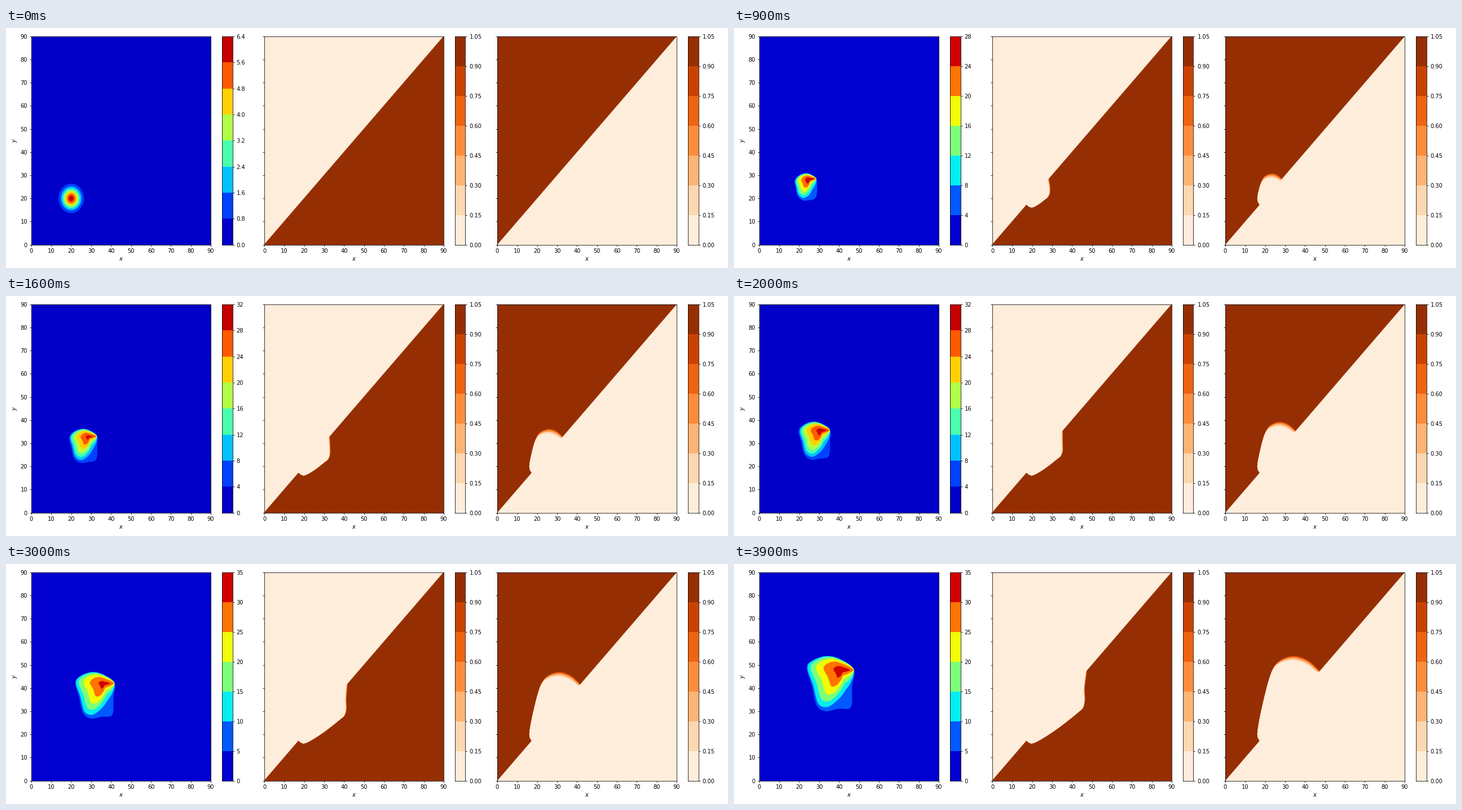
Write a matplotlib script that moves like this. It is 1280x427 px and loops after 4 s.

```python
import numpy as np
import matplotlib.pyplot as plt
from matplotlib.animation import FuncAnimation
from matplotlib.patches import Polygon
from matplotlib.ticker import MaxNLocator

W, H, DPI = 1280, 427, 64
SCALE = 10 / 9
FRAMES, INTERVAL = 40, 100
LEFT, TOP, BOTTOM, WIDTH, PITCH = 45, 15, 385.5, 318, 413
BAR_OFFSET, BAR_WIDTH = 338, 18.5

plt.rcParams.update({
    "font.family": "DejaVu Sans",
    "font.size": 10 * SCALE,
    "axes.linewidth": 0.8 * SCALE,
    "axes.labelpad": 4 * SCALE,
    **{f"{a}tick.major.{k}": v * SCALE for a in "xy"
       for k, v in (("size", 3.5), ("width", 0.8), ("pad", 3.5))},
})

# The fire starts as a small disc; every mark travels in a straight line
# from an angle on its rim to a final position.
IGNITION, RADIUS = np.array([20, 20]), 3.9
CORE_START, CORE_END = np.array([20, 22.3]), np.array([41.6, 47.7])
EDGE_HEAT = 5

# angle, final x, final y, exponent of the heat profile from edge to core
HEAT_EDGE = np.array([
    (167, 23.8, 49.6, 2.1), (135, 26.9, 52.1, 2.3), (90, 34, 53.9, 2.6),
    (60, 41, 52.3, 3), (45, 47.4, 47.9, 8), (25, 46.5, 40.7, 0.95),
    (-45, 45.7, 31.6, 0.4), (-83, 39.6, 31.1, 0.75), (-113, 33.1, 30, 1.3),
    (-154, 29.2, 31.9, 1.6), (-180, 26.3, 40.9, 1.75)])

# angle, final x, final y, thickness of the burning band
LOWER_EDGE = np.array([
    (-80, 30, 20.9, 0), (-75, 43.3, 29.7, 0.1), (-45, 45.6, 31.5, 0.5),
    (-20, 46.5, 34.5, 0.5), (10, 46.4, 40, 0.7), (45, 47.5, 47.5, 1)])
UPPER_EDGE = np.array([
    (178, 18.9, 33.5, 0), (172, 24, 48.5, 0.4), (135, 27.2, 51.8, 1.3),
    (90, 34, 53.9, 2), (66, 41.3, 52.1, 1.9), (45, 47.4, 47.4, 1.2)])


def ring(degrees, radius=RADIUS):
    a = np.radians(degrees)
    return IGNITION + radius * np.column_stack([np.cos(a), np.sin(a)])


def travel(n, start, end):
    return start + (end - start) * n / (FRAMES - 1)


def smooth(points, closed=False, steps=10):
    """Hermite curve through the points."""
    p = np.asarray(points, float)
    if closed:
        p = np.vstack([p[-1:], p, p[:2]])
    else:
        p = np.vstack([2 * p[0] - p[1], p, 2 * p[-1] - p[-2]])
    gaps = np.sqrt(np.hypot(*np.diff(p, axis=0).T)) + 1e-6
    slope = np.gradient(p, np.concatenate([[0], np.cumsum(gaps)]), axis=0)
    u = np.linspace(0, 1, steps + 1)[:, None]
    parts = []
    for i in range(1, len(p) - 2):
        parts.append((2*u**3 - 3*u**2 + 1) * p[i] + (3*u**2 - 2*u**3) * p[i + 1]
                     + gaps[i] * ((u**3 - 2*u**2 + u) * slope[i]
                                  + (u**3 - u**2) * slope[i + 1]))
    return np.vstack(parts)


def peak_heat(n):
    return 35 - 12.5 * np.exp(-n / 17.5) if n else 6


def isoline(n, level):
    if n == 0:  # Gaussian spot
        return ring(np.linspace(0, 360, 90), np.sqrt(20 * np.log(6 / level)))
    angle, power = HEAT_EDGE[:, 0], HEAT_EDGE[:, 3:]
    edge = travel(n, ring(angle), HEAT_EDGE[:, 1:3])
    core = travel(n, CORE_START, CORE_END)
    s = (level - EDGE_HEAT) / (peak_heat(n) - EDGE_HEAT)
    reach = s if s < 0 else s ** power
    return smooth(edge + (core - edge) * reach, closed=True)


def burnt_area(n, marks, trail_end, beyond, depth):
    """Fixed trail along the disc, then the front, closed past the diagonal."""
    front = travel(n, ring(marks[:, 0]), marks[:, 1:3])
    inward = IGNITION - front
    inward /= np.linalg.norm(inward, axis=1, keepdims=True)
    front += inward * marks[:, 3:] * depth * (1 + 1 / n**2)
    curve = smooth(np.vstack([ring(np.linspace(225, trail_end, 3)), front]))
    return np.vstack([curve, curve[-1] + beyond, curve[0] + beyond])


def band_colors(name, count):
    return plt.get_cmap(name)((np.arange(count) + 0.5) / count)


def pixel_axes(x, width):
    return fig.add_axes([x / W, 1 - BOTTOM / H, width / W, (BOTTOM - TOP) / H])


def draw_colorbar(ax, colors, labels):
    ax.clear()
    count = len(colors)
    ax.barh(np.arange(count), 1, height=1, align="edge", color=colors)
    ax.set(xlim=(0, 1), ylim=(0, count), xticks=[])
    ax.set_yticks(range(count + 1), labels)
    ax.yaxis.tick_right()


def add_shape(ax, points, color, zorder=1.0):
    return ax.add_patch(Polygon(points, closed=True, facecolor=color,
                                edgecolor="none", linewidth=0, zorder=zorder))


fig = plt.figure(figsize=(W / DPI, H / DPI), dpi=DPI, facecolor="white")
panels = [pixel_axes(LEFT + PITCH * i, WIDTH) for i in range(3)]
bars = [pixel_axes(LEFT + BAR_OFFSET + PITCH * i, BAR_WIDTH) for i in range(3)]
heat, lower, upper = panels
oranges = band_colors("Oranges", 7)
band_depths = np.linspace(0, 1, 6) ** 1.4

for ax in panels:
    ax.set(xlim=(0, 90), ylim=(0, 90), xlabel="$x$",
           xticks=range(0, 91, 10), yticks=range(0, 91, 10))
heat.set_ylabel("$y$")

# Each fuel fills one side of the diagonal; the other side is covered in light.
for ax, bar, corner, shift in ((lower, bars[1], (-2, 92), 0.2),
                               (upper, bars[2], (92, -2), 0)):
    ax.tick_params(labelleft=False)
    ax.set_facecolor(oranges[-1])
    add_shape(ax, [(-2, shift - 2), (92, shift + 92), corner], oranges[0], zorder=1.5)
    draw_colorbar(bar, oranges, [f"{0.15 * i:.2f}" for i in range(8)])

FUELS = ((lower, LOWER_EDGE, 270, (-2, 2)), (upper, UPPER_EDGE, 180, (2, -2)))
shapes = []


def draw(n):
    while shapes:
        shapes.pop().remove()
    levels = MaxNLocator(8, min_n_ticks=1).tick_values(0, peak_heat(n))
    colors = band_colors("jet", len(levels) - 1)
    digits = 0 if np.allclose(levels, np.round(levels)) else 1
    draw_colorbar(bars[0], colors, [f"{v:.{digits}f}" for v in levels])
    heat.set_facecolor(colors[0])
    for level, color in zip(levels[1:-1], colors[1:]):
        shapes.append(add_shape(heat, isoline(n, level), color))
    if n > 0:
        for ax, marks, trail_end, beyond in FUELS:
            for depth, color in zip(band_depths, oranges[-2::-1]):
                area = burnt_area(n, marks, trail_end, beyond, depth)
                shapes.append(add_shape(ax, area, color))
    return shapes


anim = FuncAnimation(fig, draw, frames=FRAMES, interval=INTERVAL,
                     init_func=lambda: draw(0), repeat=True)
plt.show()
```
